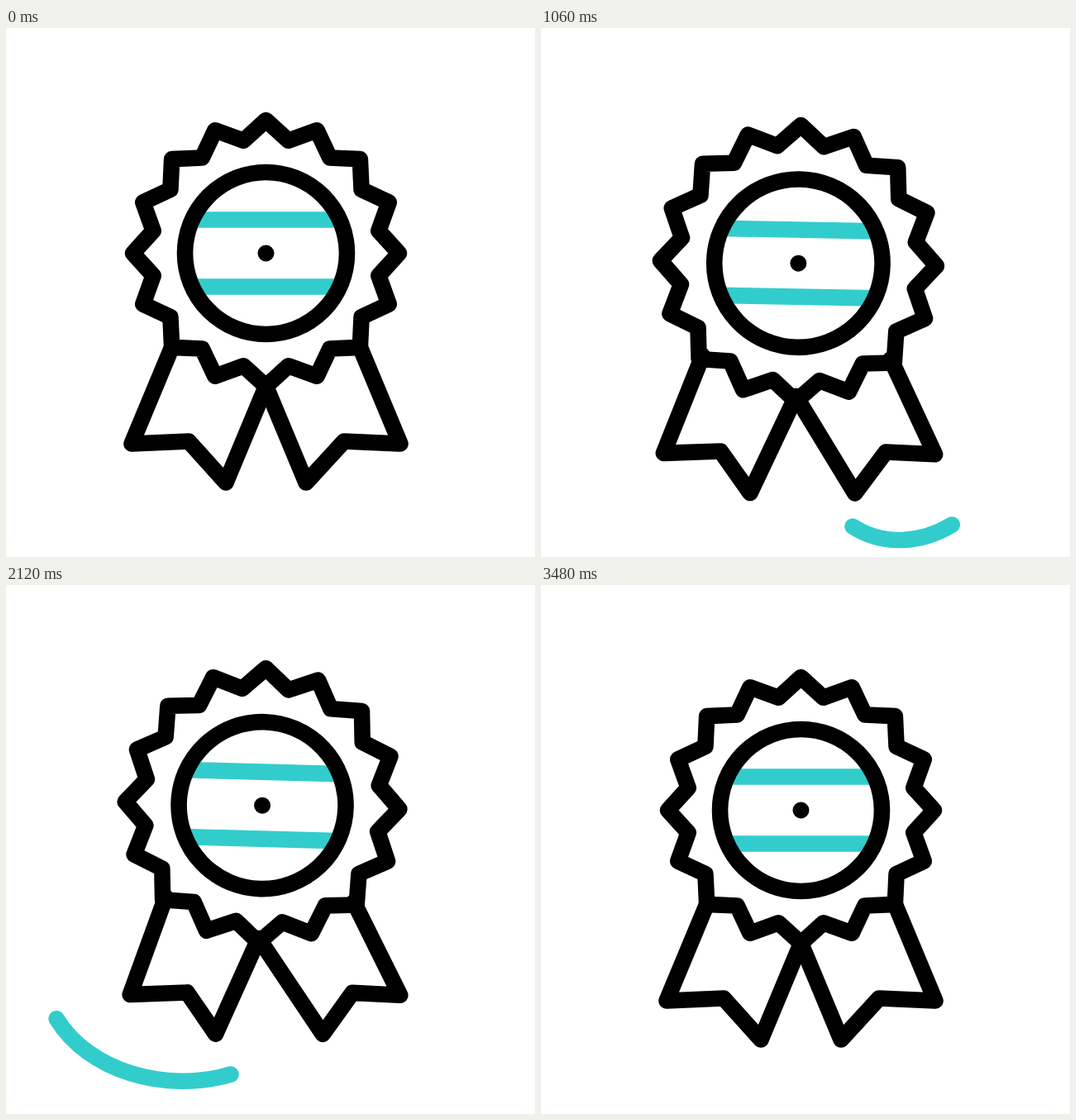
Write an HTML page that moves like this. It is 640x640 px and loops after 3.6 s.

```html
<!DOCTYPE html>
<html lang="en">
<head>
<meta charset="utf-8">
<title>Swinging rosette</title>
<style>
  html, body { margin: 0; width: 100%; height: 100%; overflow: hidden; background: #fff; }
  svg { display: block; width: 100vw; height: 100vh; }
  path, polyline, polygon, circle {
    fill: none; stroke: #000; stroke-width: 19.6;
    stroke-linecap: round; stroke-linejoin: round;
  }
  .teal { stroke: #3cc; }
  .bars { stroke-linecap: butt; }
  #dot { fill: #000; stroke: none; }
</style>
</head>
<body>
<svg viewBox="0 0 640 640">
  <g id="trails"></g>
  <polyline id="left"/>
  <polyline id="right"/>
  <g id="medal">
    <path id="bars" class="teal bars"/>
    <polygon id="star"/>
    <circle id="ring"/>
    <circle id="dot" r="10"/>
  </g>
</svg>
<script>
const LOOP = 3600, START = 160, END = 3320;
const CX = 314.5, CY = 272.5;
const OUTER = 161, INNER = 139, RING = 98, BAR_Y = 40.5;
const $ = id => document.getElementById(id);
const clamp = v => Math.max(0, Math.min(1, v));
const rad = deg => deg * Math.PI / 180;
const polar = (r, deg) => [r * Math.cos(rad(deg)), r * Math.sin(rad(deg))];

// Cosine-eased value through [time, value] turning points
const track = (...keys) => t => keys.reduce((value, [time, next], i) => {
  if (!i) return next;
  const from = keys[i - 1][0];
  const u = clamp((t - from) / (time - from));
  return value + (next - value) * (1 - Math.cos(Math.PI * u)) / 2;
}, 0);

const bounce = track([START, 0], [690, -36], [1190, 21], [1820, -33.5], [2420, 21.5], [3100, 0]);
const tilt = track([START, 0], [880, 3.5], [1300, -2.7], [1900, 3], [2620, -3.8], [END, 0]);
const swing = track([START, 0], [820, -53], [1250, 30], [1840, -41], [2440, 46], [END, 0]);
const scale = track([START, 1], [690, 1.045], [1820, 1.015], [2420, 1.046], [3100, 1]);
const flutter = t => 11 * Math.sin(Math.PI * clamp((t - START) / (END - START)));

// Free ribbon corners: how far each follows the swing and the flutter
const ribbons = {
  left: {
    pin: 135,
    corners: [
      { x: 152, y: 503, sx: 1, sy: 0.55, curl: 0 },
      { x: 221, y: 500, sx: 1, sy: 0.35, curl: 0 },
      { x: 266, y: 550, sx: 1.2, sy: 0.22, curl: -1 }
    ]
  },
  right: {
    pin: 45,
    corners: [
      { x: 477, y: 503, sx: 0.1, sy: 0.15, curl: 0 },
      { x: 409, y: 500, sx: 0.1, sy: 0.1, curl: 1 },
      { x: 363, y: 550, sx: 0.1, sy: 0.1, curl: 2 }
    ]
  }
};

function drawMedal(t) {
  const angle = tilt(t), size = scale(t), drop = bounce(t);
  // The top point of the star stays on the centre line
  const x = CX - OUTER * size * Math.sin(rad(angle));
  const y = CY + drop;
  const r = RING * size;
  const w = Math.sqrt(r * r - BAR_Y * BAR_Y);
  $('medal').setAttribute('transform', `translate(${x} ${y}) rotate(${angle})`);
  $('ring').setAttribute('r', r);
  $('bars').setAttribute('d', `M${-w} ${-BAR_Y}H${w}M${-w} ${BAR_Y}H${w}`);
  $('star').setAttribute('points', Array.from({ length: 32 }, (_, i) =>
    polar((i % 2 ? INNER : OUTER) * size, i * 11.25)).join(' '));

  const pinAt = deg => {
    const [dx, dy] = polar(OUTER, deg + angle);
    return [x + dx, y + dy];
  };
  const s = swing(t), f = flutter(t);
  for (const [id, { pin, corners }] of Object.entries(ribbons)) {
    const free = corners.map(c => [c.x + c.sx * s + c.curl * f, c.y + 1.1 * drop + c.sy * s]);
    $(id).setAttribute('points', [pinAt(pin), ...free, pinAt(90)].join(' '));
  }
}

// Each trail: its head runs for `grow` ms, its tail between `from` and `to`
const sweep = { grow: 300, from: 345, to: 725 };
const streak = { start: 2980, grow: 180, from: 320, to: 500, fade: true };
const trails = [
  { d: 'M569 492C560 582 455 653 377 603', start: 520, ...sweep },
  { d: 'M47 491C69 578 180 619 272 592', start: 1725, ...sweep },
  { d: 'M251 45V63', ...streak },
  { d: 'M377 45V64', ...streak }
];
for (const trail of trails) {
  const el = document.createElementNS('http://www.w3.org/2000/svg', 'path');
  el.setAttribute('d', trail.d);
  el.setAttribute('class', 'teal');
  el.setAttribute('pathLength', 1);
  trail.el = $('trails').appendChild(el);
}

function drawTrail({ el, start, grow, from, to, fade }, t) {
  const age = t - start;
  const head = clamp(age / grow), tail = clamp((age - from) / (to - from));
  const shown = head > tail;
  el.style.display = shown ? '' : 'none';
  if (!shown) return;
  el.style.strokeDasharray = `${head - tail} 3`;
  el.style.strokeDashoffset = -tail;
  if (fade) el.style.opacity = 1 - clamp((t - 3390) / 90);
}

function draw(t) {
  drawMedal(t);
  trails.forEach(trail => drawTrail(trail, t));
}

const begin = performance.now();
function tick() {
  draw((performance.now() - begin) % LOOP);
  requestAnimationFrame(tick);
}
tick();
</script>
</body>
</html>
```
